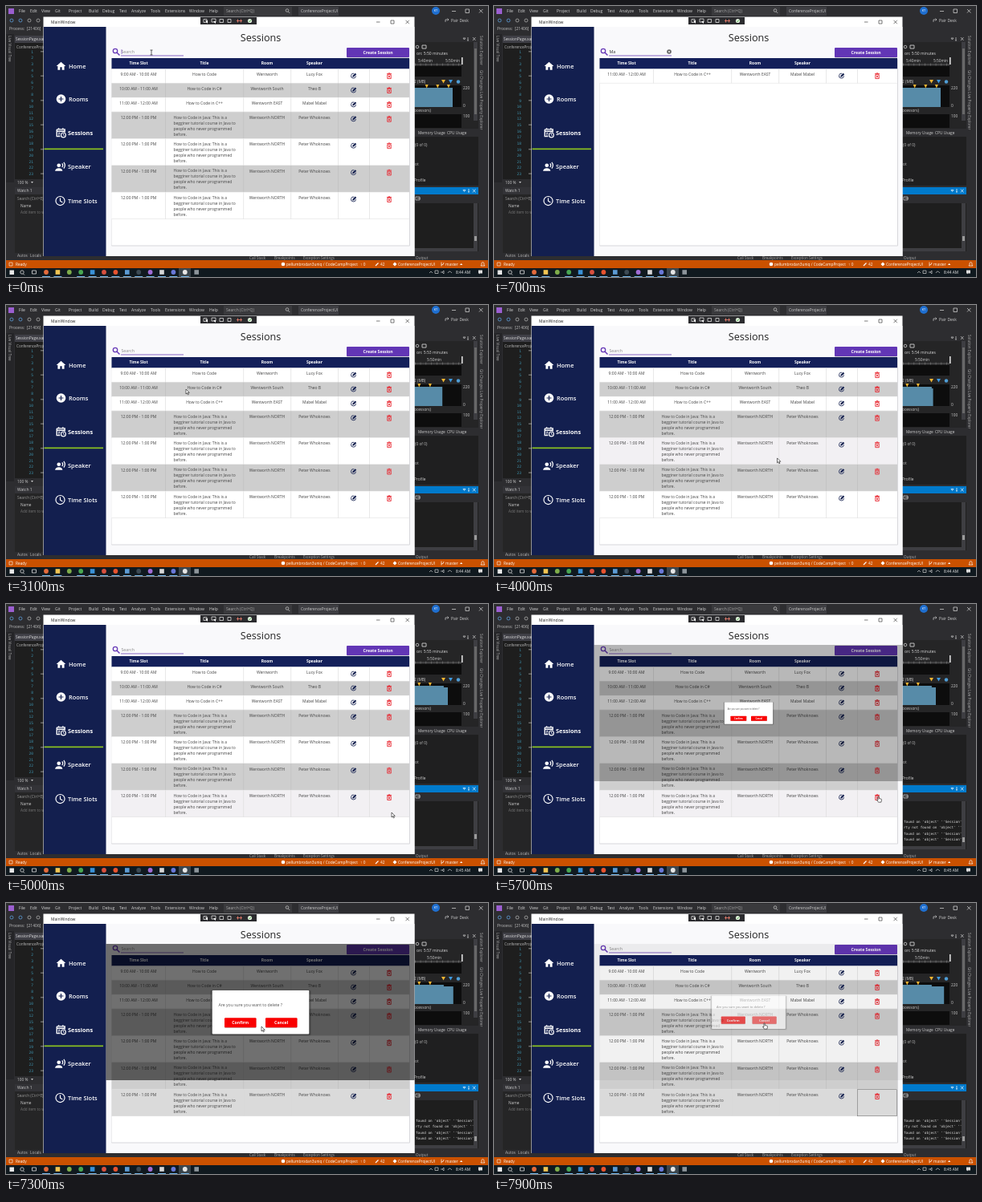
Animation, 600 px wide and 338 px high, one loop 8000 ms. Source, as an HTML page:

```html
<!DOCTYPE html>
<html lang="en">
<head>
<meta charset="utf-8">
<title>Sessions</title>
<style>
html, body { margin: 0; width: 100%; height: 100%; overflow: hidden; background: #1e1e1e; }
svg { display: block; width: 600px; height: 338px; }
text { font-family: 'Open Sans', 'Noto Sans', sans-serif; white-space: pre; }
.mono { font-family: 'DejaVu Sans Mono', monospace; }
</style>
</head>
<body>
<svg id="stage" viewBox="0 0 600 338"></svg>
<script>
(() => {
const LOOP = 8000, STEP = 100;
const stage = document.getElementById('stage');

function el(tag, attrs, parent = stage) {
  const node = document.createElementNS('http://www.w3.org/2000/svg', tag);
  for (const k in attrs) node.setAttribute(k, attrs[k]);
  parent.appendChild(node);
  return node;
}
const group = (parent, attrs = {}) => el('g', attrs, parent);
const rect = (p, x, y, width, height, fill, more) => el('rect', { x, y, width, height, fill, ...more }, p);
const dot = (p, cx, cy, r, fill, more) => el('circle', { cx, cy, r, fill, ...more }, p);
const path = (p, d, more) => el('path', { d, ...more }, p);
// y is the middle of the line
function label(p, x, y, str, size, fill, more) {
  const node = el('text', { x, y: y + size * 0.36, 'font-size': size, fill, ...more }, p);
  node.textContent = str;
  return node;
}
const MID = { 'text-anchor': 'middle' };
const BOLD = { ...MID, 'font-weight': 700 };
const show = (node, on) => node.setAttribute('visibility', on ? 'visible' : 'hidden');
const line = (color, width) => ({ fill: 'none', stroke: color, 'stroke-width': width });
// 24-unit icon centred on (x, y)
const icon = (p, x, y, size) =>
  group(p, { transform: `translate(${x - size / 2} ${y - size / 2}) scale(${size / 24})` });

/* ---------- code editor behind the window ---------- */
const back = group(stage);
rect(back, 0, 0, 600, 338, '#2d2d30');
rect(back, 3, 3, 7, 7, '#9b5fd0');
const menu = { File: 16, Edit: 30, View: 44, Git: 61, Project: 78, Build: 103, Debug: 120, Test: 141,
  Analyze: 156, Tools: 180, Extensions: 198, Window: 228, Help: 253 };
for (const name in menu) label(back, menu[name], 6, name, 5, '#d4d4d4');
rect(back, 271, 1, 85, 11, '#3a3a3d');
label(back, 274, 6, 'Search (Ctrl+Q)', 5, '#aaa');
dot(back, 350, 5.5, 1.8, 'none', line('#ccc', 0.7));
path(back, 'M351.3 7l2 2', line('#ccc', 0.7));
rect(back, 364, 1, 50, 11, '#3e3e42');
label(back, 367, 6, 'ConferenceProjectUI', 4.8, '#ccc');
dot(back, 535, 6, 5, '#1f6fd0');
label(back, 535, 6, 'KT', 4, '#fff', MID);
path(back, 'M555 6.5h5M572 4h4.5v4.5h-4.5zM589 4l4.5 4.5m0-4.5l-4.5 4.5', line('#ddd', 0.7));
for (let i = 0; i < 4; i++) dot(back, 7 + i * 11, 18, 2, 'none', line(i < 2 ? '#5b9bd5' : '#aaa', 0.8));
path(back, 'M547 20v-3h4m-1.5-1.5l1.5 1.5-1.5 1.5', line('#ccc', 0.7));
label(back, 554, 18, 'Pair Desk', 5, '#ccc');
label(back, 4, 28, 'Process:  [21406]', 5, '#c0c0c0');

rect(back, 0, 35, 10, 185, '#252528');
label(back, 0, 0, 'Live Visual Tree', 4.6, '#aaa', { transform: 'translate(5 37) rotate(90)' });
rect(back, 11, 37, 36, 9, '#3f3f46');
label(back, 12, 41.5, 'SessionPage.xaml', 4.8, '#ddd');
rect(back, 11, 46, 36, 170, '#1e1e1e');
label(back, 13, 51, 'ConferenceProject', 4.6, '#bbb');
for (let n = 0; n < 21; n++) {
  const y = 57 + n * 7.62;
  label(back, 34, y, n + (n > 11 ? 3 : 1), 4.6, '#3e93af', { class: 'mono', 'text-anchor': 'end' });
  if (n % 4 == 0) rect(back, 43, y - 1, 4, 1.5, '#6a6a6a');
}
label(back, 14, 220, '100 %', 4.8, '#ccc');
path(back, 'M31 219l1.5 2 1.5-2z', { fill: '#ccc' });
rect(back, 11, 226, 36, 82, '#252526');
rect(back, 11, 226, 36, 9, '#333337');
label(back, 14, 230.5, 'Watch 1', 5, '#d0d0d0');
label(back, 14, 240, 'Search (Ctrl+E)', 4.8, '#999');
label(back, 18, 249, 'Name', 4.8, '#ccc');
label(back, 18, 257, 'Add item to watch', 4.6, '#777');
label(back, 14, 311, 'Autos', 4.8, '#bbb');
label(back, 30, 311, 'Locals', 4.8, '#bbb');

/* ---------- diagnostics panel ---------- */
rect(back, 508, 36, 80, 188, '#252526');
rect(back, 508, 36, 80, 9, '#2d2d30');
path(back, 'M569 40l1.5 2 1.5-2zM575 39v4m-1 0h2M581 39l3.5 4m0-4l-3.5 4', line('#ccc', 0.7));
dot(back, 512, 51, 1.8, 'none', line('#ccc', 0.8));
path(back, 'M518 49h5v4h-5z', line('#ccc', 0.9));
rect(back, 582, 45, 5, 98, '#3e3e42');
rect(back, 583, 53, 3, 82, '#686868');
const elapsed = label(back, 511, 59, '', 5, '#d8d8d8');
path(back, 'M509 73h58', line('#888', 0.6));
path(back, 'M509 73h58', { ...line('#888', 3), 'stroke-dasharray': '0.5 6.3' });
const clip = el('clipPath', { id: 'chart' }, back);
rect(clip, 508, 60, 59, 66, '#000');
const view = group(back, { 'clip-path': 'url(#chart)' });
const mark40 = label(view, 0, 68, '5:40min', 4.8, '#ccc', MID);
const mark50 = label(view, 0, 68, '5:50min', 4.8, '#ccc', MID);
rect(back, 567, 64, 1.6, 9, '#ddd');
rect(back, 509, 75, 58, 13, '#0d0d0d');
label(back, 508, 94, '2 (MB)', 4.8, '#ccc');
path(back, 'M542 92h5l-2.5 4.5z', { fill: '#f2b632' });
path(back, 'M551 92h5l-2.5 4.5z', { fill: '#3f9ae0' });
dot(back, 563, 94.5, 2.2, '#4f9ed6');
rect(back, 509, 99, 58, 27, '#0d0d0d');
const chart = group(back, { 'clip-path': 'url(#chart)' });
const area = path(chart, '', { fill: '#578ba8' });
const flags = [0, 1, 2].map(() => path(chart, 'M-2 98h4l-2 4.5z', { fill: '#f2b632' }));
label(back, 569, 102, '220', 4.8, '#ccc');
label(back, 569, 124, '0', 4.8, '#ccc');
label(back, 508, 130, 'ocessors)', 4.8, '#ccc');
label(back, 569, 137, '100', 4.8, '#ccc');
rect(back, 509, 135, 58, 17, '#0d0d0d');
rect(back, 508, 153, 80, 10, '#2d2d30');
label(back, 513, 158, 'Memory Usage', 4.8, '#ccc');
label(back, 549, 158, 'CPU Usage', 4.8, '#ccc');
rect(back, 508, 163, 80, 61, '#1f1f20');
label(back, 509, 173, '(0 of 0)', 4.8, '#bbb');
label(back, 509, 197, 'ot', 4.8, '#bbb');
label(back, 508, 217, 'Profile', 4.8, '#ccc');
[['Solution Explorer', 37], ['Git Changes', 80], ['Live Property Explorer', 107]].forEach(([s, y]) =>
  label(back, 0, 0, s, 4.6, '#aaa', { transform: `translate(592 ${y}) rotate(90)` }));

rect(back, 503, 226, 85, 9, '#007acc');
path(back, 'M569 229.5l1.5 2 1.5-2zM576 228v4m-1 0h2M581 228.5l3.5 4m0-4l-3.5 4', line('#fff', 0.7));
path(back, 'M510 238h5v4h-5zM512 240h4', line('#ccc', 0.7));
rect(back, 508, 246, 80, 60, '#1e1e1e');
rect(back, 582, 246, 5, 56, '#3e3e42');
rect(back, 508, 302, 79, 4, '#3e3e42');
const thumb = rect(back, 583, 0, 3, 6, '#9a9a9a');
const log = group(back);
["found on 'object' ''Session'", "rty not found on 'object' ''", "found on 'object' ''Session'",
  "found on 'object' ''Session'"].forEach((s, i) =>
  label(log, 510, 271 + i * 7.5, s, 4.3, '#dcdcdc', { class: 'mono' }));
['Call Stack', 'Breakpoints', 'Exception Settings', 'Output'].forEach((s, i) =>
  label(back, [303, 334, 370, 510][i], 314, s, 4.6, '#aaa'));

/* ---------- status bar and taskbar ---------- */
rect(back, 0, 317, 600, 10, '#ca5100');
path(back, 'M4 320h4v4h-4z', line('#fff', 0.6));
label(back, 12, 322, 'Ready', 4.8, '#fff');
dot(back, 345, 322, 2.3, '#fff');
label(back, 349, 322, 'pellumbrodan3uniq / CodeCampProject', 4.8, '#fff');
label(back, 441, 322, '↑ 0', 4.8, '#fff');
path(back, 'M460 324l3.5-3.5', line('#fff', 1.1));
label(back, 466, 322, '42', 4.8, '#fff');
path(back, 'M484 319.5l2.5 2.5-2.5 2.5-2.5-2.5z', { fill: '#fff' });
label(back, 488, 322, 'ConferenceProjectUI', 4.8, '#fff');
path(back, 'M542 319.5v5m0-1.5q3 0 3-3', line('#fff', 0.7));
label(back, 547, 322, 'master', 4.8, '#fff');
path(back, 'M565 323l1.7-2 1.7 2z', { fill: '#fff' });
path(back, 'M591 324h5l-1-1.5v-2q-1.5-2-3 0v2z', line('#fff', 0.7));

rect(back, 0, 327, 600, 11, '#10191f');
rect(back, 215, 327, 15, 11, '#3a454c');
rect(back, 4.5, 329.5, 5.5, 5.5, '#e8e8e8');
dot(back, 20, 332, 2.2, 'none', line('#ddd', 0.8));
path(back, 'M21.5 334l1.5 1.5', line('#ddd', 0.8));
path(back, 'M32.5 330h5v4h-5z', line('#ddd', 0.8));
['#e46b3c', '#f1c553', '#7fae4a', '#48a852', '#3a91d8', '#d9503f', '#e8532f', '#5c9bd4', '#3c4a54',
  '#a06cd5', '#d8d8d8', '#6978d8', '#e6e6e6', '#8c949a'].forEach((c, i) => {
  const x = 50 + i * 14.4;
  i % 3 == 1 ? rect(back, x - 2.8, 329.2, 5.6, 5.6, c) : dot(back, x, 332, 2.9, c);
  if (i != 2 && i < 13) rect(back, x - 5, 337, 10, 1, '#76b9ed');
});
path(back, 'M527 333l2-2 2 2M534 330h4v3.5h-4zM541 332h2l2-2v4l-2-2M550 333q2-4 5 0', line('#ccc', 0.7));
const clock = label(back, 560, 332, '', 4.8, '#eee');
path(back, 'M588 329.5h5v4h-3l-1 1v-1h-1z', { fill: '#ddd' });

/* ---------- application window ---------- */
const app = group(stage);
rect(app, 46.5, 13.5, 462, 298.5, '#fff');
label(app, 56, 20, 'MainWindow', 5, '#222');
path(app, 'M461 20h4.5M479 18h4v4h-4zM497.5 17.8l4.4 4.4m0-4.4l-4.4 4.4', line('#222', 0.6));
rect(app, 242, 14, 70, 9, '#2b2b2e');
path(app, 'M246 16.5h4v4h-4zM256 16h5v4h-5zM266 16.5h4.5v4h-4.5zM276 16.5h4v4h-4z', line('#ddd', 0.8));
path(app, 'M248 18l3 4v-4zM258 19l3 3v-3z', { fill: '#fff' });
path(app, 'M287 18.5h7M288.5 16.5v4M292.5 16.5v4', line('#e07a6a', 0.9));
dot(app, 303.5, 18.5, 2.6, '#e9f5e4');
path(app, 'M302 18.5l1.2 1.2 2-2.4', line('#3c9c3c', 0.9));
rect(app, 124, 26, 384.5, 286, '#f9f9fb');
rect(app, 47, 26, 77.5, 286, '#131f4f');

const sideIcons = [
  g => path(g, 'M10 20v-6h4v6h5v-8h3L12 3 2 12h3v8z', { fill: '#fff' }),
  g => path(g, 'M12 2a10 10 0 1 0 0 20 10 10 0 0 0 0-20zm5 11h-4v4h-2v-4H7v-2h4V7h2v4h4z', { fill: '#fff' }),
  g => { path(g, 'M3 5h17v6M3 5v15h7M3 9h17M7 2v4M16 2v4M6 13h4M6 17h3', line('#fff', 2.4));
    dot(g, 17, 17, 5, 'none', line('#fff', 2)); path(g, 'M17 14v3l2 2', line('#fff', 1.5)); },
  g => { dot(g, 9, 9, 4, '#fff'); path(g, 'M1 21q1-6 8-6t8 6z', { fill: '#fff' });
    path(g, 'M16 5q3 4 0 8M19.5 2.5q5 6.5 0 13', line('#fff', 2)); },
  g => { dot(g, 12, 12, 9.5, 'none', line('#fff', 2)); path(g, 'M12 6v6.5l5 3', line('#fff', 2)); }
];
['Home', 'Rooms', 'Sessions', 'Speaker', 'Time Slots'].forEach((s, i) => {
  const y = [75, 116, 158, 200.5, 243][i];
  sideIcons[i](icon(app, i < 3 ? 68.5 : 67.5, y, 14));
  label(app, i < 2 ? 78 : 77, y, s, 7.4, '#fff', { 'font-weight': i == 2 ? 700 : 600 });
});
rect(app, 47.5, 177.5, 73.5, 1.7, '#8cc220');
label(app, 317, 39.5, 'Sessions', 12.6, '#222', MID);

/* ---------- search and button ---------- */
dot(app, 136, 56, 2.7, 'none', line('#673ab7', 1.3));
path(app, 'M138 58l3.5 3.5', line('#673ab7', 1.5));
const hint = label(app, 143.5, 57, 'Search', 5.2, '#888');
const typed = label(app, 143.5, 57, '', 5.4, '#333');
const caret = rect(app, 143.5, 54, 0.6, 6, '#673ab7');
rect(app, 143, 61.5, 78, 0.9, '#7b56bd');
const clearIcon = group(app);
dot(clearIcon, 218, 57, 2.8, '#666');
path(clearIcon, 'M217 56l2 2m0-2l-2 2', line('#fff', 0.7));
rect(app, 424, 53, 78, 11.8, '#777', { opacity: 0.35, rx: 1 });
rect(app, 424, 52, 78, 12, '#6236b5', { rx: 1 });
label(app, 463, 58, 'Create Session', 5.1, '#fff', BOLD);

/* ---------- table ---------- */
rect(app, 131, 66, 372, 233.5, '#d8d8dc', { rx: 1 });
rect(app, 131.5, 65.5, 370.5, 233, '#fff');
rect(app, 131.5, 65, 370.5, 13.5, '#14205a');
const cols = { 'Time Slot': 165, Title: 247, Room: 325, Speaker: 384 };
for (const name in cols) label(app, cols[name], 71.5, name, 5, '#fff', BOLD);

const edges = [198, 295.5, 354.5, 413, 452];
const longTitle = ['How to Code in Java: This is a', 'begginer tutorial course in Java to',
  'people who never programmed', 'before.'];
const late = ['12:00 PM - 1:00 PM', longTitle, 'Wentworth NORTH', 'Peter Whoknows'];
const data = [
  ['9:00 AM - 10:00 AM', 'How to Code', 'Wentworth', 'Lucy Fox'],
  ['10:00 AM - 11:00 AM', 'How to Code in C#', 'Wentworth South', 'Theo B'],
  ['11:00 AM - 12:00 AM', 'How to Code in C++', 'Wentworth EAST', 'Mabel Mabel'],
  late, late, late, late
];
let rowY = 78.5;
const rows = data.map(([slot, title, room, speaker], i) => {
  const big = Array.isArray(title), h = big ? 33.4 : 17.9, y = rowY;
  const g = group(app);
  const bg = rect(g, 131.5, y, 370.5, h, '#fff');
  edges.forEach(x => rect(g, x, y, 0.6, h, i % 2 ? '#bdbdbd' : '#dadada'));
  rect(g, 131.5, y + h - 0.5, 370.5, 0.5, '#dcdcdc');
  const ty = y + 6.7;
  label(g, 165, ty, slot, 5, '#444', MID);
  if (big) title.forEach((s, n) => label(g, 208.5, ty + n * 6.95, s, 4.95, '#444'));
  else label(g, 247, ty, title, 5, '#444', MID);
  label(g, 325, ty, room, 5, '#444', MID);
  label(g, 384, ty, speaker, 5, '#444', MID);
  const pen = icon(g, 432.5, y + 8.7, 9);
  path(pen, 'M20 12a8 8 0 1 1-6-8', line('#14204f', 2.2));
  path(pen, 'M9 15.5v-4l9-9 4 4-9 9z', { fill: '#14204f' });
  const bin = icon(g, 477, y + 8.7, 9);
  path(bin, 'M4 5h16M9 3h6M6 8h12v13H6zM9 11l6 7M15 11l-6 7', line('#e8202a', 2.2));
  rowY += h;
  return { g, bg, y, h };
});
const focusCell = rect(app, 452.3, rows[6].y + 0.3, 49.4, 33, 'none', line('#777', 0.6));

/* ---------- dialog ---------- */
const shade = rect(app, 124.5, 51, 384, 170, '#000');
const dialog = group(app);
for (let i = 3; i > 0; i--) rect(dialog, 257 - i, 110 - i / 2, 120 + 2 * i, 54 + i, '#000', { opacity: 0.12, rx: 2 });
rect(dialog, 256.7, 109, 120.6, 54.5, '#fff', { rx: 1 });
label(dialog, 264.5, 127, 'Are you sure you want to delete ?', 5.15, '#555');
[['Confirm', 272], ['Cancel', 323]].forEach(([s, x]) => {
  rect(dialog, x, 144, 39.5, 12, '#888', { opacity: 0.5, rx: 1 });
  rect(dialog, x, 143.3, 39.5, 12, '#f90000', { rx: 1 });
  label(dialog, x + 19.7, 149.3, s, 5.2, '#fff', BOLD);
});
const ripple = rect(dialog, 323, 143.3, 39.5, 12, '#fff', { opacity: 0.22, rx: 1 });

/* ---------- pointer ---------- */
const pointers = { i: group(stage), a: group(stage), h: group(stage) };
const skin = { fill: '#fff', stroke: '#111', 'stroke-width': 0.6 };
path(pointers.i, 'M-1.5-3h3M0-3v6M-1.5 3h3', line('#222', 0.7));
path(pointers.a, 'M0 0v6l1.4-1.3 1 2.2 1-.5-1-2.1h1.9z', skin);
path(pointers.h, 'M0 0q.9-.6 1.2.4v2.2l2.8.6q.7.3.5 1.2l-.6 2.8h-3.4l-2-2.8q.2-.8 1.5.2z', skin);

// time, x, y, shape from here on
const track = [
  [0, 181, 58, 'i'], [200, 181, 58, ''], [1000, 181, 58, 'i'], [1400, 214, 55, 'a'], [1500, 217, 56, 'a'],
  [2800, 217, 56, 'a'], [3100, 224, 105, 'a'], [3700, 300, 165, 'a'], [4500, 466, 247, 'a'],
  [5000, 480, 260, 'a'], [5400, 478, 240, 'h'], [5950, 478, 240, 'a'], [6400, 290, 148, 'h'],
  [6900, 283, 150, 'h'], [7200, 313, 155, 'a'], [7300, 318, 154, 'a'],
  [7500, 330, 152, 'h'], [7600, 336, 150, 'h'], [8000, 336, 150, 'h']
];
function pointerAt(t) {
  const n = track.findIndex((k, i) => i + 1 == track.length || t < track[i + 1][0]);
  const a = track[n], b = track[n + 1] || a;
  const p = (t - a[0]) / (b[0] - a[0] || 1), e = p * p * (3 - 2 * p);
  return { x: a[1] + (b[1] - a[1]) * e, y: a[2] + (b[2] - a[2]) * e, shape: a[3] };
}

const clamp = v => Math.min(1, Math.max(0, v));
const OPEN = 5600, CLOSE = 7765;

function drawPanel(t) {
  const sec = 50 + Math.floor((t + 100) / 1000);
  elapsed.textContent = `on: 5:${sec} minutes`;
  clock.textContent = t < 4800 ? '8:44 AM' : '8:45 AM';
  const zero = sec > 50 ? 533 : 556;
  const at = s => zero + (s - 50) * 3.4;
  mark50.setAttribute('x', zero);
  mark40.setAttribute('x', at(40));
  const end = at(sec);
  let d = `M508 126V102H${Math.min(end, at(53.5))}`;
  if (sec > 53) d += `V104H${end}`;
  area.setAttribute('d', d + 'V126z');
  flags.forEach((f, i) => f.setAttribute('transform', `translate(${at(40.5 + i * 4)} 0)`));
  show(log, t >= OPEN);
  thumb.setAttribute('y', t < OPEN ? 287 : 291);
}

function drawTable(t, ptr) {
  const text = t < 200 || t >= 1800 ? '' : t < 500 ? 'M' : 'Ma';
  typed.textContent = text;
  show(hint, !text);
  show(clearIcon, text);
  caret.setAttribute('x', 143.7 + (text ? typed.getComputedTextLength() : 0));
  show(caret, t < OPEN && t % 1060 < 530);
  rows.forEach((r, i) => {
    show(r.g, !text || i == 2);
    r.g.setAttribute('transform', `translate(0 ${text && i == 2 ? rows[0].y - r.y : 0})`);
    const over = t > 2800 && t < 6000 && ptr.y >= r.y && ptr.y < r.y + r.h;
    let fill = i % 2 ? '#cecece' : over ? '#f2f0f3' : '#fff';
    if (i == 6 && t >= 6000) fill = '#dadada';
    r.bg.setAttribute('fill', fill);
  });
  show(focusCell, t >= CLOSE);
}

function drawDialog(t) {
  const opened = Math.sin(clamp((t - OPEN) / 300) * Math.PI / 2);
  const p = clamp((t - CLOSE) / 300);
  const scale = opened * Math.cos(p * Math.PI / 2);
  const c = 1 - scale;
  dialog.setAttribute('transform', `translate(${317 * c} ${136 * c}) scale(${scale})`);
  dialog.setAttribute('opacity', 1 - 0.85 * p);
  show(dialog, scale > 0.01);
  shade.setAttribute('opacity', 0.56 * opened * clamp(1 - 2 * p));
  show(ripple, scale > 0.01 && t >= 7700);
}

function render(t) {
  const ptr = pointerAt(t);
  drawPanel(t);
  drawTable(t, ptr);
  drawDialog(t);
  for (const k in pointers) {
    show(pointers[k], k == ptr.shape);
    pointers[k].setAttribute('transform', `translate(${ptr.x} ${ptr.y})`);
  }
}

const start = performance.now();
function tick() {
  const t = (performance.now() - start) % LOOP;
  render(Math.floor(t / STEP) * STEP);
  requestAnimationFrame(tick);
}
tick();
})();
</script>
</body>
</html>
```
